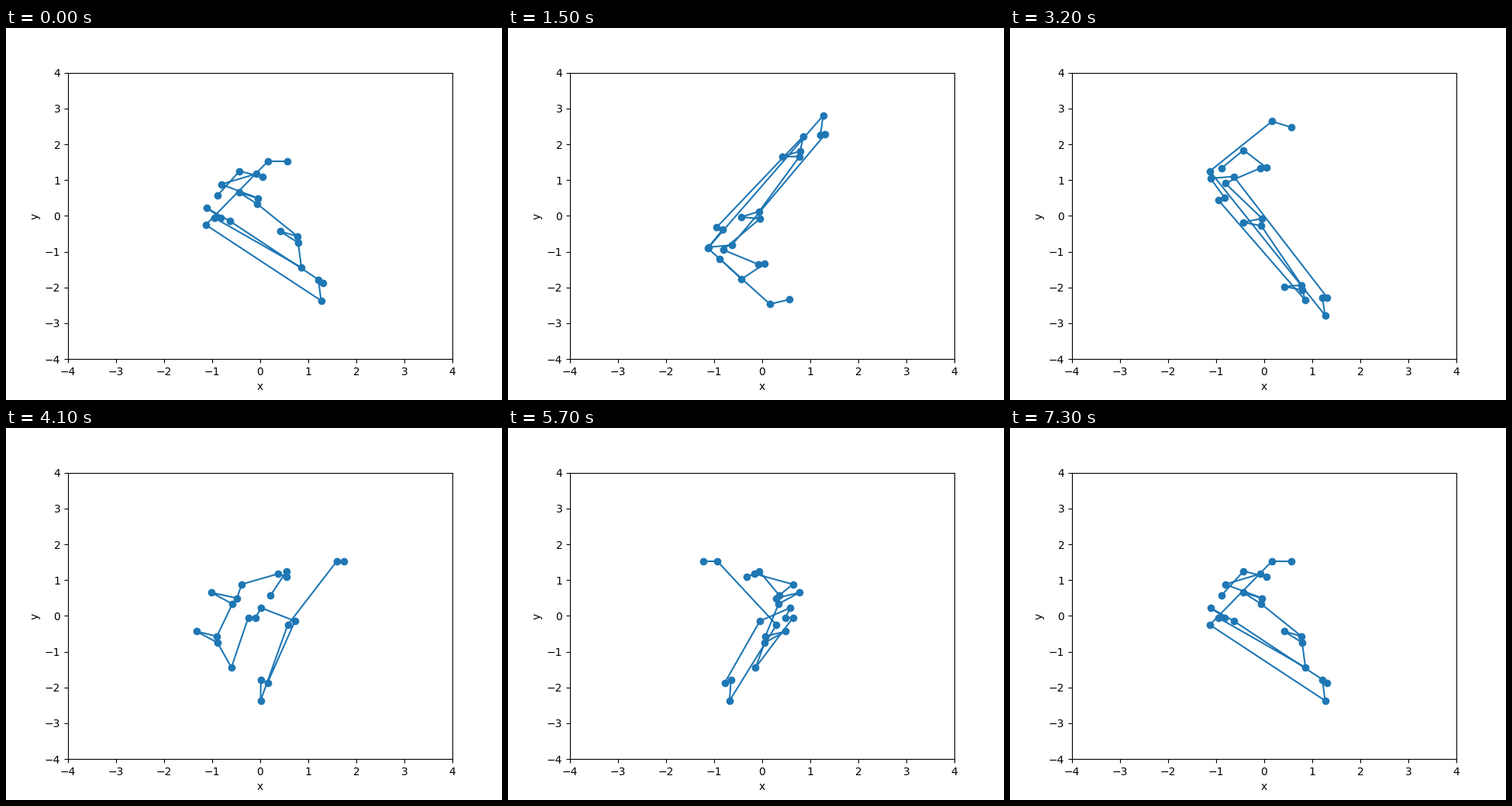
Animation of 640 by 480 pixels, one loop 7400 ms. Source, as a matplotlib script:

```python
import numpy as np
import matplotlib.pyplot as plt
from matplotlib.animation import FuncAnimation

STEPS = 37  # ten degrees per step, both ends included

# Tilted axes of the body: each leg of the path runs mainly along one of them
along = np.array([0.4875, -0.4302, -0.7597])
depth = np.array([0.607, -0.459, 0.649])
across = np.cross(depth, along)


def go(a=0, c=0, d=0):
    """One leg: distances along, across and in depth."""
    return [a * along + c * across + d * depth]


def spur(a, back):
    """Short side trip in depth and back again."""
    return go(-0.14, 0.02, -0.52) + go(a, 0.11, back)


def build():
    legs = (
        go()
        + go(-0.39, -0.26, -0.08) + go(0.17, c=-2.19)
        + go(4.92) + go(-0.33, 0.41, -0.25) + go(d=0.16)
        + go(-4.12, d=0.11) + go(d=-0.80)
        + go(0.67, d=-0.04) + go(c=-0.09, d=-0.13)
        + go(3.53, 0.16, -0.02) + go(-0.05, 0.51, -0.60)
        + spur(0.06, 0.43) + go(-1.94, 0.12, 0.05)
        + spur(-0.02, 0.54) + go(-1.35, -0.22, 0.05)
        + go(c=0.68, d=0.51) + go(d=0.20)
        + go(-0.73, -0.19) + go(0.05, -0.81, 0.05)
    )
    path = np.cumsum(legs, axis=0)
    return path - path.mean(axis=0)


def rotate(points, axis, angle):
    x, y, z = points.T
    c, s = np.cos(angle), np.sin(angle)
    if axis == "x":
        return x, y * c - z * s
    return x * c + z * s, y


fig, ax = plt.subplots(figsize=(6.4, 4.8), dpi=100)
ax.set(xlim=(-4, 4), ylim=(-4, 4), xlabel="x", ylabel="y")
line, = ax.plot([], [], "o-", color="C0")

chain = build()
angles = np.linspace(0, 2 * np.pi, STEPS)


def update(i):
    turn, step = divmod(i, STEPS)
    line.set_data(*rotate(chain, "xy"[turn], angles[step]))
    return line,


anim = FuncAnimation(fig, update, frames=2 * STEPS, interval=100,
                     repeat=True, repeat_delay=0)
plt.show()
```
